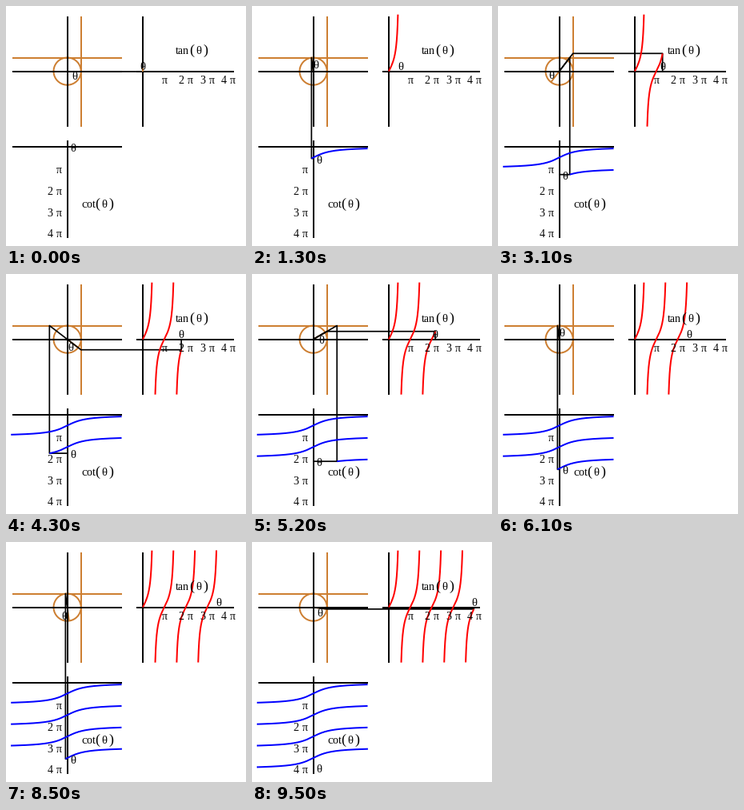
A matplotlib script for the animation above (9.6 s loop, 300x300 px).

```python
import numpy as np
import matplotlib.pyplot as plt
from matplotlib.animation import FuncAnimation

SIZE, DPI = 300, 100
FRAMES, INTERVAL = 96, 100
U = 17.1                 # pixels per unit
T = U / 2                # pixels per radian on the theta axes
CX, CY = 76.6, 81.6      # centre of the circle
TX, CTY = 171, 176       # theta = 0 on the tan and cot graphs
GOLD = "#cd7f32"
SERIF = "Liberation Serif"

plt.rcParams.update({"lines.solid_capstyle": "butt",
                     "text.hinting": "native",
                     "text.hinting_factor": 1})
fig = plt.figure(figsize=(SIZE / DPI, SIZE / DPI), dpi=DPI, facecolor="white")
ax = fig.add_axes([0, 0, 1, 1])
ax.set(xlim=(0, SIZE), ylim=(SIZE, 0))
ax.axis("off")


def px(n):
    return n * 72 / DPI


def line(xs=(), ys=(), color="black", width=2, z=2):
    return ax.plot(xs, ys, color=color, lw=px(width), zorder=z)[0]


def label(x, y, s, ha="center", size=14):
    return ax.text(x, y, s, ha=ha, va="baseline", fontsize=px(size),
                   family=SERIF, zorder=6)


def func_name(x, y, name):
    label(x, y, name, "left")
    label(x + 20.5, y + 0.5, "(", size=18)
    label(x + 28.5, y, "θ")
    label(x + 37, y + 0.5, ")", size=18)


# Axes
line((8, 145), (CY, CY))
line((CX, CX), (13, 151))
line((163, 285), (CY, CY))
line((TX, TX), (13, 151))
line((8, 145), (CTY, CTY))
line((CX, CX), (167.5, 290))

# Unit circle with its two tangents
a = np.linspace(0, 2 * np.pi, 181)
line(CX + U * np.cos(a), CY + U * np.sin(a), GOLD, z=1)
line((CX + U, CX + U), (13, 151), GOLD, z=1)
line((8, 145), (CY - U, CY - U), GOLD, z=1)

for k in range(1, 5):
    tick = "π" if k == 1 else f"{k} π"
    label(TX + k * np.pi * T, 97, tick)
    label(70, CTY + 6 + k * np.pi * T, tick, "right")

func_name(212, 60, "tan")
func_name(94, 252, "cot")

radius = line(color=GOLD, z=1)
tan_path = line(width=1.7, z=3)
cot_path = line(width=1.7, z=3)
tan_curve = line(color="red", z=4)
cot_curve = line(color="blue", z=4)
start_mark = line((TX, TX), (78, 82), GOLD, z=5)
circle_theta, tan_theta, cot_theta = (label(0, 0, "θ") for _ in range(3))

grid = np.linspace(0.001, 4 * np.pi, 6400)
tan_grid = np.tan(grid)
cot_grid = 1 / tan_grid
tan_grid[(tan_grid > 4.18) | (tan_grid < -4.04)] = np.nan
cot_grid[(cot_grid > 4) | (cot_grid < -4.13)] = np.nan


def draw(i):
    th = i * 4 * np.pi / FRAMES
    c, s = np.cos(th), np.sin(th)
    tx, cy = TX + th * T, CTY + th * T
    n = np.searchsorted(grid, th)

    radius.set_data((CX, CX + U * c), (CY, CY - U * s))
    tan_curve.set_data(TX + grid[:n] * T, CY - U * tan_grid[:n])
    cot_curve.set_data(CX + U * cot_grid[:n], CTY + grid[:n] * T)

    # Projections vanish while they would leave the graph
    tan_path.set_data([], [])
    cot_path.set_data([], [])
    if abs(s) < 4 * abs(c):
        y = CY - U * s / c
        tan_path.set_data((CX, CX + U, tx, tx), (CY, y, y, CY))
    if abs(c) < 4 * abs(s):
        x = CX + U * c / s
        cot_path.set_data((CX, x, x, CX), (CY, CY - U, cy, cy))

    start_mark.set_visible(i == 0)
    circle_theta.set_position((CX + 0.6 * U * np.cos(th - 0.5),
                               CY + 5.5 - 0.6 * U * np.sin(th - 0.5)))
    tan_theta.set_position((tx, 80))
    cot_theta.set_position((84, cy + 6))


anim = FuncAnimation(fig, draw, frames=FRAMES, interval=INTERVAL,
                     init_func=lambda: draw(0), repeat=True)
plt.show()
```
